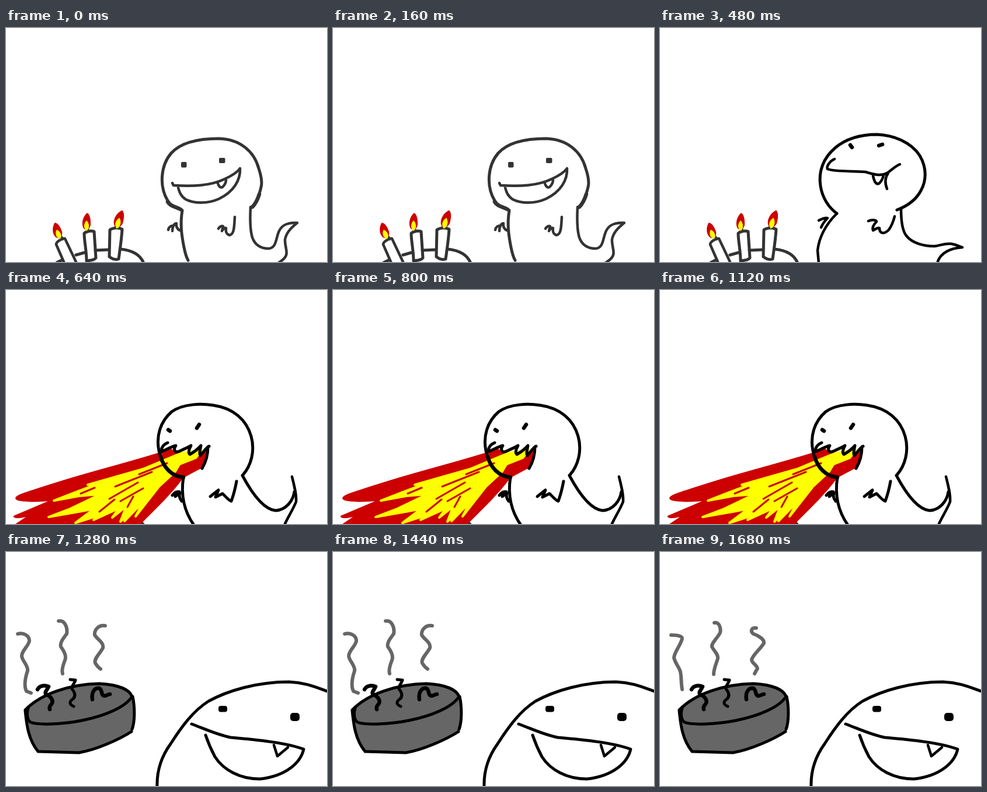
An HTML page without scripts that plays this animation: 550x400 px, repeating every 1760 ms.

```html
<!DOCTYPE html>
<html lang="en">
<head>
<meta charset="utf-8">
<title>Dragon and candles</title>
<style>
  html, body { margin: 0; width: 100%; height: 100%; overflow: hidden; background: #fff; }
  svg { display: block; width: 550px; height: 400px; fill: none; stroke-linecap: round; stroke-linejoin: round; }
  .pencil { stroke: #333; stroke-width: 5; }
  .ink { stroke: #000; stroke-width: 5; }
  .smoke { stroke: #666; stroke-width: 6; }
  .thin { stroke-width: 4.5; }
  .thick { stroke-width: 6.5; }
  .red { fill: #c00; stroke: none; }
  .yellow { fill: #ff0; stroke: none; }
  .grey { fill: #666; stroke: none; }
  .dot { fill: currentColor; stroke: none; }
  .core { fill: #ff0; stroke: #ff0; stroke-width: 4; }
  .streaks { stroke: #c00; stroke-width: 3; }

  /* Scenes cut hard; odd and even drawings swap every 80 ms. */
  .scene { opacity: 0; animation: 1760ms step-end infinite; }
  .candles { animation-name: candles; }
  .smile { animation-name: smile; }
  .inhale { animation-name: inhale; }
  .blaze { animation-name: blaze; }
  .burnt { animation-name: burnt; }
  @keyframes candles { 0% { opacity: 1 } 36.36%, 100% { opacity: 0 } }
  @keyframes smile { 0% { opacity: 1 } 18.18%, 100% { opacity: 0 } }
  @keyframes inhale { 0% { opacity: 0 } 18.18% { opacity: 1 } 36.36%, 100% { opacity: 0 } }
  @keyframes blaze { 0% { opacity: 0 } 36.36% { opacity: 1 } 72.72%, 100% { opacity: 0 } }
  @keyframes burnt { 0% { opacity: 0 } 72.72%, 100% { opacity: 1 } }

  .even { animation: even 160ms step-end infinite; }
  .odd { animation: odd 160ms step-end infinite; }
  @keyframes even { 0% { opacity: 1 } 50%, 100% { opacity: 0 } }
  @keyframes odd { 0% { opacity: 0 } 50%, 100% { opacity: 1 } }
</style>
</head>
<body>
<svg viewBox="0 0 550 400" xmlns="http://www.w3.org/2000/svg">
  <defs>
    <g id="flame">
      <path class="red" d="M1-29C-5-24-8-15-7-8C-6-2-3 0 1 0C5-2 8-7 7-13C7-20 5-27 1-29Z"/>
      <path class="yellow" d="M0-16C-4-12-5-6-3-2L0 2L3-1C5-6 4-12 0-16Z"/>
    </g>
    <g id="flames">
      <use href="#flame" transform="translate(92 359) rotate(-20) scale(1.05 .95)"/>
      <use href="#flame" transform="translate(138 345)"/>
      <use href="#flame" transform="translate(190 341) rotate(15) scale(1.1 1.06)"/>
    </g>
    <g id="flamesFlipped">
      <use href="#flame" transform="translate(92 359) rotate(-12) scale(-1.05 .95)"/>
      <use href="#flame" transform="translate(138 345) scale(-1 1)"/>
      <use href="#flame" transform="translate(190 341) rotate(8) scale(-1.1 1.06)"/>
    </g>
    <g id="inhaler">
      <path d="M303 317C289 307 278 290 275 270C271 245 280 222 300 205C320 188 345 182 372 182C400 183 430 195 445 218C458 240 456 262 447 278C438 295 422 305 406 311"/>
      <path d="M303 317C285 335 273 355 270 380L272 402M413 309C413 325 414 345 422 355C432 368 452 373 470 373C480 372 490 367 500 369C510 371 514 374 518 375C500 376 480 383 475 402" class="thin"/>
      <path class="thick" d="M326 200L329 204M375 201L381 199"/>
      <path class="thin" d="M299 224C290 228 285 237 287 241C300 246 330 244 352 246C365 250 378 254 389 248C398 242 403 236 411 233M391 248C386 255 385 265 389 275M365 253C367 262 370 268 375 266C380 262 382 256 383 252"/>
      <path class="thin" d="M272 329C278 326 283 324 287 325C283 329 279 334 276 341M357 330C363 327 370 328 371 331C366 336 363 341 365 346C370 343 374 341 376 342C376 352 384 353 392 345C397 338 400 330 402 322"/>
    </g>
    <g id="fire">
      <path class="red" d="M262 278L280 270L294 277L315 280L334 282L347 269C346 285 342 297 336 304L304 321C285 347 262 369 229 402H13L34 388C22 391 11 391 13 386L72 361C50 363 16 363 16 356C17 350 30 347 60 337C130 314 200 297 262 278Z"/>
      <path class="core" d="M335 274L300 279L278 288L235 306L140 333L158 331L118 346L82 360L126 352L162 349L110 374L73 388L130 378L151 374L119 398L166 383L150 393L194 373L182 389L206 370L196 396L216 376L203 395L236 361L222 387L262 336L290 310L297 298L325 287Z"/>
      <path class="streaks" d="M250 311L187 336M226 329L177 357M235 339L196 361M218 353L208 371M186 358L160 379M276 296L228 315M152 338L128 348"/>
    </g>
  </defs>

  <g class="scene candles pencil">
    <path d="M87 401L97 396M120 388L134 384M153 380L176 379M197 378C215 380 230 387 236 402"/>
    <path class="thin" d="M100 402L86 370C86 365 97 359 101 360L121 402M97 361L94 356"/>
    <path d="M138 398C138 380 134 365 134 351C138 347 147 346 151 348L154 393C150 398 143 397 138 398M140 346V343"/>
    <path d="M177 391L178 345C184 341 193 341 199 344C198 362 195 380 193 395C187 397 181 394 177 391M188 341L189 338"/>
    <use href="#flames" class="even"/>
    <use href="#flamesFlipped" class="odd"/>
  </g>

  <g class="scene smile pencil" color="#333">
    <path d="M301 311C290 306 282 304 277 295C262 270 265 235 283 214C302 193 335 189 365 189C400 190 425 210 433 240C438 255 439 265 437 272C434 285 430 298 422 306"/>
    <path class="thick" d="M277 297C281 305 290 305 299 310M434 284C431 294 427 301 422 306"/>
    <path d="M302 312C298 335 301 355 305 375C307 385 309 392 312 397"/>
    <path class="thin" d="M419 306C418 325 418 345 422 358C427 372 437 377 450 377C462 376 462 364 466 352C470 338 480 332 499 333C488 342 480 350 478 362C478 375 484 385 478 392C475 397 470 399 466 402"/>
    <rect class="dot" x="300" y="229" width="9.500" height="9.500" rx="2"/>
    <rect class="dot" x="365" y="222" width="10.500" height="9" rx="2"/>
    <path class="thin" d="M285 265L287 269C320 271 350 270 375 258C388 252 396 247 401 240C402 260 390 280 365 292C345 301 322 300 308 293C299 287 297 280 295 273M362 263C364 270 367 274 371 272C375 268 377 264 377 260"/>
    <path class="thin" d="M278 345C279 340 283 338 286 338L285 347C285 340 288 334 292 334C291 340 294 344 298 346M364 343C366 339 370 338 372 339L370 347C372 343 375 341 377 342C376 348 378 353 383 354C391 353 391 340 392 323"/>
  </g>

  <g class="scene inhale ink">
    <use href="#inhaler" class="even"/>
    <g class="odd"><use href="#inhaler" transform="translate(-4 4)"/></g>
  </g>

  <g class="scene blaze ink">
    <path d="M228 393L236 402" stroke="#333"/>
    <use href="#fire" class="even"/>
    <g class="odd"><use href="#fire" transform="translate(300 300) scale(1.05 .98) translate(-300 -300)"/></g>
    <path d="M304 320C285 320 267 300 262 275C257 250 264 225 284 208C304 194 335 194 355 197C390 202 412 222 420 250C427 275 420 300 406 316"/>
    <path class="thick" d="M265 285C270 303 284 319 304 320"/>
    <path d="M304 320C300 345 303 375 322 402M405 317C420 345 440 375 462 377C480 376 492 360 494 345"/>
    <path class="thin" d="M490 319C494 335 498 350 497 362C492 375 482 390 477 402"/>
    <path class="thick" d="M278 239L281 241M327 236L331 230"/>
    <path d="M277 261C270 264 265 270 267 276C275 273 282 268 291 266C286 273 290 279 296 276C305 272 312 269 317 266C313 273 312 278 315 281C322 277 328 273 334 266C332 275 331 280 333 283C338 278 342 270 348 267"/>
    <path d="M346 268C346 282 342 295 336 305"/>
    <path d="M285 351C288 347 292 344 297 345L290 353L298 347C296 352 297 356 301 361M350 353L364 342L359 354L371 348C376 353 382 360 386 361C390 350 393 338 395 327"/>
  </g>

  <g class="scene burnt ink">
    <path class="grey" d="M33 270C35 290 37 320 55 342H125C155 338 195 318 218 304C221 285 221 260 214 246C205 230 175 224 150 225C110 228 60 245 33 270Z"/>
    <path d="M33 270C60 242 110 226 160 225C195 227 212 236 216 247C205 265 170 280 130 288C95 295 55 296 42 291C36 287 35 275 38 267"/>
    <path d="M33 272C35 290 37 320 55 341L125 343C155 338 195 320 215 307M217 247C221 265 221 290 216 303"/>
    <path class="thick" d="M54 235C58 227 68 228 73 230C70 237 66 239 68 243C78 247 82 255 78 260C75 263 74 266 75 269M148 252C146 240 152 231 160 233C166 237 162 244 168 246C172 246 175 243 178 243"/>
    <path d="M110 218L119 219C117 226 112 228 113 234C118 240 120 246 115 251C109 255 107 260 116 264"/>
    <g class="smoke">
      <path class="even" d="M20 140C30 137 40 143 40 152C38 162 27 168 27 178C28 187 38 193 37 203C33 215 30 228 35 238L43 241M90 118C100 116 106 128 104 140C98 148 92 155 94 162C100 170 104 178 101 185C97 195 95 202 97 208M170 126C158 124 151 134 152 142C158 151 168 155 166 164C160 175 150 183 153 190C156 195 159 198 162 200"/>
      <path class="odd" d="M19 142C28 142 38 143 38 148C35 160 24 172 24 181C26 190 33 197 35 205C37 215 36 225 38 235M93 121C101 119 105 130 103 138C98 148 88 155 89 162C93 170 100 175 99 182C96 192 92 200 92 209M165 130C157 129 154 135 160 140C170 143 179 150 178 156C170 168 160 175 157 184C157 190 166 193 167 199L162 208"/>
    </g>
    <path d="M259 402C258 375 266 350 282 328C300 300 320 272 347 255C380 237 430 222 485 222C515 223 535 233 553 239"/>
    <path d="M318 294C340 302 360 312 385 317C430 321 480 326 510 337C505 360 480 383 435 388C400 388 372 372 358 350C350 335 346 325 342 313"/>
    <path class="thin" d="M459 330L465 349L483 334"/>
    <rect class="dot" x="364" y="263" width="15" height="10.500" rx="4"/>
    <rect class="dot" x="487" y="275" width="16" height="14" rx="5"/>
  </g>
</svg>
</body>
</html>
```
